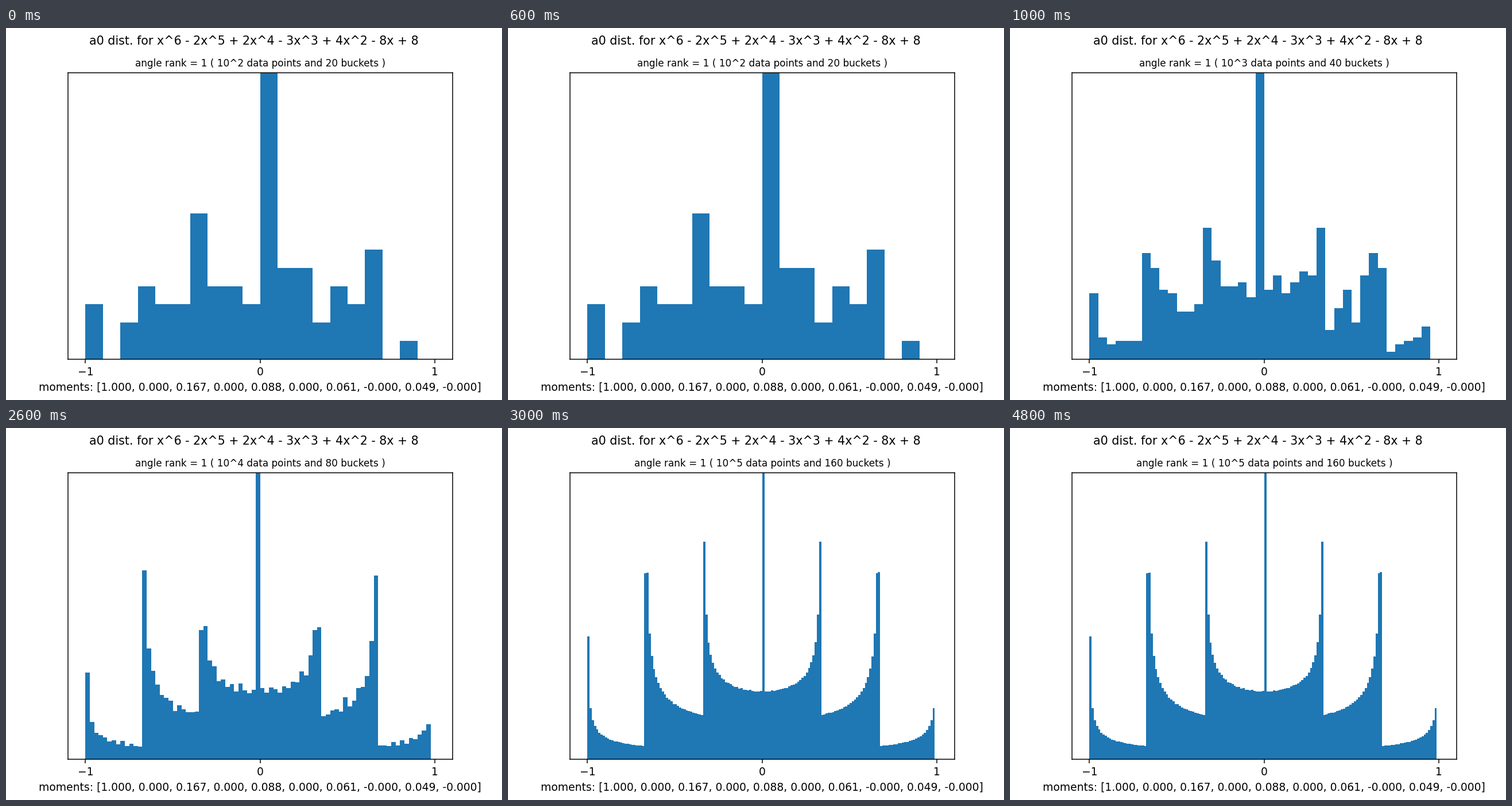
Animation of 864x648 px, one loop 6 s. Source, as a matplotlib script:

```python
import numpy as np
import matplotlib.pyplot as plt
from matplotlib.animation import FuncAnimation

plt.rcParams["font.family"] = "DejaVu Sans"

# Normalised traces of Frobenius powers: the three angles are theta and
# theta +- 60 degrees, so their cosines sum to an amplitude of period six.
THETA = np.arccos(1 / np.sqrt(8))
AMPLITUDES = np.array([3, 2, 0, -1, 0, 2]) / 3
MOMENTS = "[1.000, 0.000, 0.167, 0.000, 0.088, 0.000, 0.061, -0.000, 0.049, -0.000]"
LEVELS = 4

fig, ax = plt.subplots(figsize=(6.4, 4.8), dpi=135)
fig.subplots_adjust(left=0.125, right=0.9, bottom=0.11, top=0.88)
fig.suptitle("a0 dist. for x^6 - 2x^5 + 2x^4 - 3x^3 + 4x^2 - 8x + 8", fontsize=11)


def traces(count):
    n = np.arange(1, count + 1)
    return AMPLITUDES[n % 6] * np.cos(n * THETA)


def draw(second):
    level = min(second, LEVELS - 1)
    exponent = level + 2
    count = 10 ** exponent
    buckets = 20 * 2 ** level

    ax.clear()
    # The half-open range leaves out the topmost bucket.
    ax.hist(traces(count), bins=np.arange(-1, 1, 2 / buckets), color="#1f77b4")
    ax.set_xlim(-1.1, 1.1)
    ax.set_ylim(0, np.pi * count / buckets)
    ax.set_xticks([-1, 0, 1])
    ax.set_yticks([])
    ax.set_xlabel(f"moments: {MOMENTS}", fontsize=10)
    ax.set_title(
        f"angle rank = 1 ( 10^{exponent} data points and {buckets} buckets )",
        fontsize=9,
    )
    return ax.patches


anim = FuncAnimation(fig, draw, frames=6, interval=1000, repeat=True,
                     repeat_delay=0, init_func=lambda: [], blit=False)
plt.show()
```
